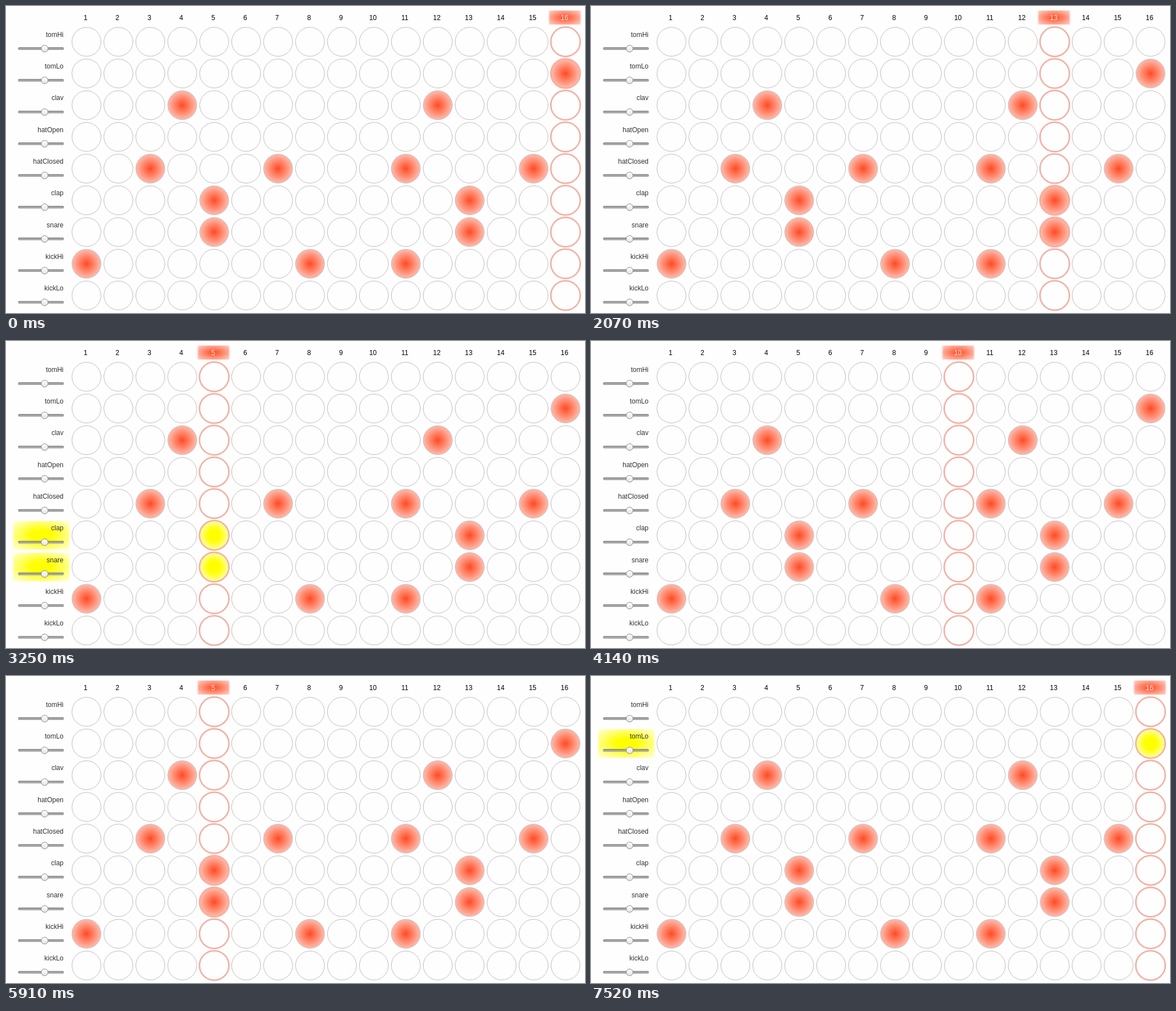
Animation of 1027 by 545 pixels, one loop 7620 ms. Source, as an HTML page:

```html
<!DOCTYPE html>
<html lang="en">
<head>
<meta charset="utf-8">
<title>Drum sequencer</title>
<style>
  html, body { margin: 0; width: 100%; height: 100%; overflow: hidden; background: #fefefe; }
  svg { display: block; width: 1027px; height: 545px; }
  text { font: 12px "Liberation Sans", Arial, sans-serif; }
  .label { fill: #333; text-anchor: end; }
  .number { fill: #000; text-anchor: middle; }
  .number.now { fill: #ffe9e3; }
  .pad { fill: #fefefe; stroke: #bdbdbd; stroke-width: 1; }
  .pad.on { fill: url(#red); }
  .pad.hit { fill: url(#yellow); }
  .ring { fill: none; stroke: #f3ac9e; stroke-width: 2; }
  .halo { fill: none; stroke: #f8cfc6; stroke-width: 1.3; }
</style>
</head>
<body>
<svg id="stage" viewBox="0 0 1027 545">
  <defs>
    <radialGradient id="red">
      <stop offset="0" stop-color="#ff4a22"/>
      <stop offset="1" stop-color="#ffbcae"/>
    </radialGradient>
    <radialGradient id="yellow">
      <stop offset="0.42" stop-color="#ffff00"/>
      <stop offset="1" stop-color="#ffffa6"/>
    </radialGradient>
    <radialGradient id="headerFill" r="0.707">
      <stop offset="0" stop-color="#ff4a22"/>
      <stop offset="1" stop-color="#ffd5cc"/>
    </radialGradient>
    <radialGradient id="labelFill" r="0.707">
      <stop offset="0.25" stop-color="#ffff00"/>
      <stop offset="1" stop-color="#ffffe0"/>
    </radialGradient>
    <linearGradient id="track" x2="0" y2="1">
      <stop offset="0" stop-color="#858585"/>
      <stop offset="1" stop-color="#c9c9c9"/>
    </linearGradient>
    <linearGradient id="thumb" x2="0" y2="1">
      <stop offset="0" stop-color="#ffffff"/>
      <stop offset="1" stop-color="#e4e4e4"/>
    </linearGradient>
    <filter id="soft" x="-10%" y="-10%" width="120%" height="120%">
      <feGaussianBlur stdDeviation="1.2 0.4"/>
    </filter>
  </defs>
</svg>
<script>
const COLUMNS = 16;
const RADIUS = 25.7;
const LOOP = 7620;
const LAST_STEP = 51;

// Each voice with the columns it plays on.
const voices = [
  ["tomHi", []],
  ["tomLo", [16]],
  ["clav", [4, 12]],
  ["hatOpen", []],
  ["hatClosed", [3, 7, 11, 15]],
  ["clap", [5, 13]],
  ["snare", [5, 13]],
  ["kickHi", [1, 8, 11]],
  ["kickLo", []]
];

const stage = document.getElementById("stage");
const columnX = c => 142.7 + c * 56.65;
const rowY = r => 63.5 + r * 56.3;

function add(parent, tag, attributes, content = "") {
  const node = document.createElementNS("http://www.w3.org/2000/svg", tag);
  for (const name in attributes) node.setAttribute(name, attributes[name]);
  node.textContent = content;
  return parent.appendChild(node);
}

const header = add(stage, "rect", {
  y: 8, width: 56, height: 25, fill: "url(#headerFill)", filter: "url(#soft)"
});

const numbers = Array.from({ length: COLUMNS }, (_, c) =>
  add(stage, "text", { class: "number", x: columnX(c) - 1.7, y: 25 }, c + 1));

const rows = voices.map(([name, beats], r) => {
  const y = rowY(r);
  const glow = add(stage, "rect", {
    x: 12.5, y: y - 25.3, width: 100, height: 50.5,
    fill: "url(#labelFill)", filter: "url(#soft)"
  });
  add(stage, "text", { class: "label", x: 102, y: y - 8.7 }, name);
  add(stage, "rect", {
    x: 22, y: y + 10.3, width: 80, height: 3.6, rx: 1,
    fill: "url(#track)", stroke: "#777", "stroke-width": 0.8
  });
  add(stage, "circle", {
    cx: 68.5, cy: y + 12.2, r: 6,
    fill: "url(#thumb)", stroke: "#858585", "stroke-width": 1
  });
  const pads = numbers.map((_, c) => add(stage, "circle", {
    class: beats.includes(c + 1) ? "pad on" : "pad",
    cx: columnX(c), cy: y, r: RADIUS
  }));
  return { beats, glow, pads };
});

const cursor = add(stage, "g", {});
rows.forEach((_, r) => {
  add(cursor, "circle", { class: "halo", cy: rowY(r), r: 27.1 });
  add(cursor, "circle", { class: "ring", cy: rowY(r), r: 25.9 });
});

// Steps last 150 ms, apart from a few that are 10 ms shorter.
const shortSteps = [0, 4, 9, 16, 21, 25, 28, 32, 37, 41, 43, 47, 50];
// On these steps the cursor stays on its column while the hit fades out.
const holds = [0, 11, 26, 40];
const FADED_STEPS = 5;

function stepAt(time) {
  let step = 0;
  let end = 0;
  while (step < LAST_STEP) {
    end += shortSteps.includes(step) ? 140 : 150;
    if (time < end) break;
    step++;
  }
  return step;
}

function show(step) {
  const passed = holds.filter(h => h <= step);
  const column = (step + COLUMNS - passed.length) % COLUMNS;
  const flashing = step - passed[passed.length - 1] >= FADED_STEPS;

  header.setAttribute("x", columnX(column) - 29.2);
  cursor.setAttribute("transform", `translate(${columnX(column)} 0)`);
  numbers.forEach((n, c) => n.classList.toggle("now", c === column));
  for (const { beats, glow, pads } of rows) {
    const hit = flashing && beats.includes(column + 1);
    glow.setAttribute("visibility", hit ? "visible" : "hidden");
    pads.forEach((p, c) => p.classList.toggle("hit", hit && c === column));
  }
}

const start = performance.now();
let shown = -1;

function tick() {
  const step = stepAt((performance.now() - start) % LOOP);
  if (step !== shown) show(shown = step);
  requestAnimationFrame(tick);
}
tick();
</script>
</body>
</html>
```
